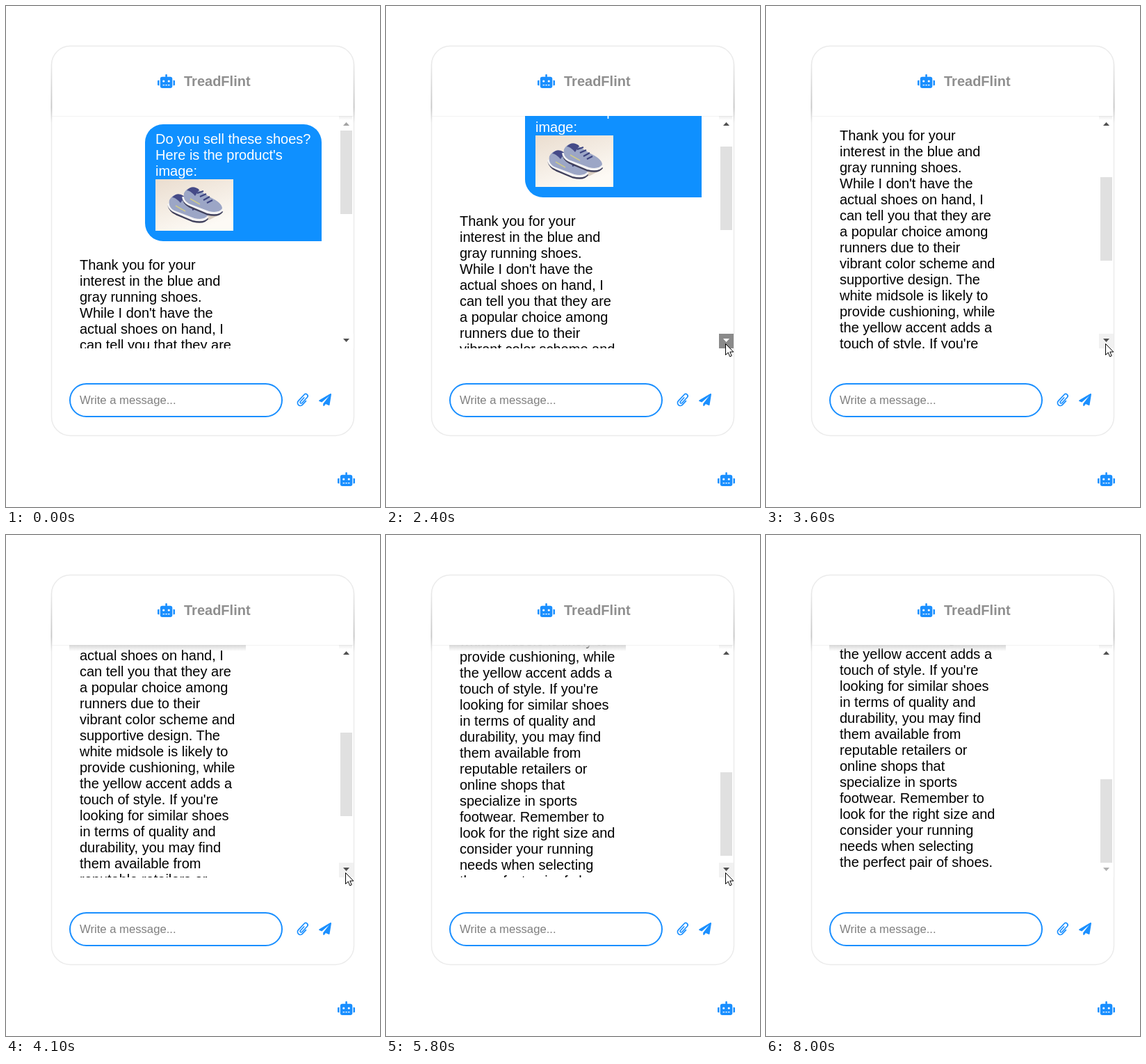
An HTML page for the animation above (8.1 s loop, 538 by 720 pixels).

```html
<!DOCTYPE html>
<html lang="en">
<head>
<meta charset="utf-8">
<title>Chat widget</title>
<style>
  html, body { margin: 0; height: 100%; overflow: hidden; background: #fff; }
  svg { display: block; width: 100vw; height: 100vh; }
  text { font: 20px "Liberation Sans", Arial, sans-serif; }
  .blue { fill: #1a8fff; }
</style>
</head>
<body>
<svg viewBox="0 0 538 720">
  <defs>
    <clipPath id="view"><rect x="66" y="158" width="434" height="334"/></clipPath>
    <clipPath id="photoBox"><rect width="112" height="74"/></clipPath>
    <linearGradient id="edge" x2="0" y2="1">
      <stop stop-color="#c8c8c8" stop-opacity="0"/>
      <stop offset=".75" stop-color="#c8c8c8"/>
      <stop offset="1" stop-color="#c8c8c8" stop-opacity="0"/>
    </linearGradient>
    <linearGradient id="shade" x2="0" y2="1">
      <stop stop-color="#d6d6d6"/>
      <stop offset="1" stop-color="#d6d6d6" stop-opacity="0"/>
    </linearGradient>
    <linearGradient id="backdrop" x2=".5" y2="1">
      <stop stop-color="#eaddcf"/>
      <stop offset="1" stop-color="#fdfaf5"/>
    </linearGradient>
    <g id="robot">
      <rect x="11.3" width="2.5" height="6" rx="1.25"/>
      <rect x="3.8" y="3.8" width="17.5" height="16.2" rx="3"/>
      <path d="M2.5 8.8v7.5H1.2a1.2 1.2 0 0 1-1.2-1.2v-5a1.2 1.2 0 0 1 1.2-1.3zM22.5 8.8h1.3a1.2 1.2 0 0 1 1.2 1.3v5a1.2 1.2 0 0 1-1.2 1.2h-1.3z"/>
      <g fill="#fff">
        <circle cx="8.75" cy="10" r="1.6"/>
        <circle cx="16.25" cy="10" r="1.6"/>
        <path d="M7.5 15H10v1.3H7.5zM11.3 15h2.5v1.3h-2.5zM15 15h2.5v1.3H15z"/>
      </g>
    </g>
  </defs>

  <!-- card and header -->
  <rect x="65.5" y="57.5" width="435" height="560" rx="27" fill="#fff" stroke="#ebebeb" stroke-width="1.5"/>
  <path d="M66 158.5H500" stroke="#f3f3f3"/>
  <rect x="64.5" y="78" width="1.8" height="90" fill="url(#edge)"/>
  <rect x="499.7" y="78" width="1.8" height="90" fill="url(#edge)"/>
  <use href="#robot" class="blue" x="218" y="98"/>
  <text x="256" y="115" fill="#8f8f8f" style="font-weight:bold">TreadFlint</text>

  <!-- conversation -->
  <g clip-path="url(#view)">
    <g id="chat">
      <path d="M226 170H428a26 26 0 0 1 26 26V338H226a26 26 0 0 1-26-26V196a26 26 0 0 1 26-26z" fill="#0f90ff"/>
      <g id="question" fill="#fff"></g>
      <g transform="translate(215 249)" clip-path="url(#photoBox)">
        <rect width="112" height="74" fill="url(#backdrop)"/>
        <path d="M22 48L58 62L78 58L94 50L60 34z" fill="#d9cdbf"/>
        <g id="shoe">
          <path d="M19 38Q21 46 30 50L54 60Q70 64 75 56" fill="none" stroke="#40405c" stroke-width="3"/>
          <path d="M19 35Q20 43 30 47L54 57Q70 61 75 53" fill="none" stroke="#f4f3f4" stroke-width="4"/>
          <path d="M20 30Q26 19 37 23L58 36Q75 44 75 52Q70 59 56 56L27 45Q18 40 20 30z" fill="#9ca6c6"/>
          <path d="M24 26Q32 17 42 25L36 34Q29 26 24 26z" fill="#454a87"/>
          <path d="M39 30l9-3M43 35l9-4M48 40l9-5M53 44l8-4" stroke="#3c437f" stroke-width="2.2"/>
          <path d="M29 38l14 8" stroke="#cfcb8a" stroke-width="1.5"/>
        </g>
        <use href="#shoe" x="21" y="-10"/>
      </g>
      <g id="answer"></g>
    </g>
    <rect id="band" x="91" y="158" width="254" height="9" fill="url(#shade)"/>
    <rect x="479" y="158" width="19" height="6" fill="url(#shade)" opacity=".45"/>
    <rect id="thumb" x="481" width="17" height="120" fill="#e0e0e0"/>
    <path id="up" d="M485 172h9l-4.500-5z"/>
    <rect id="button" x="479" y="471" width="21" height="21"/>
    <path id="down" d="M485 478h9l-4.500 5z"/>
  </g>

  <!-- message field -->
  <rect x="92" y="543" width="305" height="47" rx="23.500" fill="#fff" stroke="#1a8fff" stroke-width="2"/>
  <text x="106" y="572" fill="#808080" style="font-size:16.67px">Write a message...</text>
  <path transform="translate(427.500 566) rotate(43)" fill="none" stroke="#1a8fff" stroke-width="1.7" stroke-linecap="round"
    d="M4-1.500V6A4 4 0 0 1-4 6V-6.500A2.900 2.900 0 0 1 1.800-6.500V4.500A1.500 1.500 0 0 1-1.200 4.500V-3"/>
  <path class="blue" d="M466.700 557.100L450.500 566.500q-1 .9 0 1.500l3.800 1.600 10.500-9.200-8.600 11v2.600q.4 1.600 1.500.8l2.200-2.800 4.600 1.900q.9.100 1-.7l2.500-15.200q-.2-1.200-1.300-.9z"/>
  <use href="#robot" class="blue" x="477" y="670"/>

  <path id="cursor" d="M0 0V16L3.700 12.500 6.200 18.300 8.800 17.200 6.300 11.600H11.300z" fill="#fff" stroke="#000"/>
</svg>

<script>
const $ = id => document.getElementById(id);
const LOOP = 8100, FRAME = 100, MAX_SCROLL = 477, STEP = 50, GLIDE = 200;
const HOME = [488.5, 485.5];

// Presses on the scroll button: start time and how long it is held
const clicks = [
  [1960, 110], [2332, 110], [2750, 640], [3470, 110], [3710, 110],
  [3956, 110], [4450, 110], [5050, 110], [5430, 110], [5830, 110]
];

const question = `Do you sell these shoes?
Here is the product's
image:`;
const answer = `Thank you for your
interest in the blue and
gray running shoes.
While I don't have the
actual shoes on hand, I
can tell you that they are
a popular choice among
runners due to their
vibrant color scheme and
supportive design. The
white midsole is likely to
provide cushioning, while
the yellow accent adds a
touch of style. If you're
looking for similar shoes
in terms of quality and
durability, you may find
them available from
reputable retailers or
online shops that
specialize in sports
footwear. Remember to
look for the right size and
consider your running
needs when selecting
the perfect pair of shoes.`;

function write(id, copy, x, y) {
  $(id).innerHTML = copy.split("\n")
    .map((line, i) => `<text x="${x}" y="${y + 23 * i}">${line}</text>`).join("");
}
write("question", question, 215, 198);
write("answer", answer, 106, 379);

const ease = p => (1 - Math.cos(Math.PI * Math.min(1, Math.max(0, p)))) / 2;
const mix = (a, b, p) => a.map((v, i) => v + (b[i] - v) * p);
const set = (id, name, value) => $(id).setAttribute(name, value);

function cursorAt(t) {
  return t < 6650
    ? mix([1, 95], HOME, ease((t - 950) / 750))
    : mix(HOME, [28, 101], ease((t - 6650) / 350));
}

function draw(now) {
  const t = Math.floor(now % LOOP / FRAME) * FRAME;
  const travel = clicks.reduce((sum, [start]) => sum + STEP * ease((t - start) / GLIDE), 0);
  const scroll = Math.round(Math.min(MAX_SCROLL, travel));
  const atEnd = scroll === MAX_SCROLL;
  const hover = t >= 1700 && t < 6700 && !atEnd;
  const pressed = hover && clicks.some(([start, held]) => t >= start && t < start + held);

  set("chat", "transform", `translate(0 ${-scroll})`);
  set("thumb", "y", Math.round(179 + scroll * 172 / MAX_SCROLL));
  set("band", "opacity", scroll > 193 ? 1 : 0);
  set("up", "fill", scroll ? "#505050" : "#a3a3a3");
  set("button", "fill", pressed ? "#8a8a8a" : hover ? "#f1f1f1" : "#fff");
  set("down", "fill", pressed ? "#fff" : atEnd ? "#b0b0b0" : "#505050");
  set("cursor", "transform", `translate(${cursorAt(t)})`);
  set("cursor", "opacity", t >= 800 && t < 7100 ? 1 : 0);
  requestAnimationFrame(() => draw(performance.now()));
}
draw(0);
</script>
</body>
</html>
```
